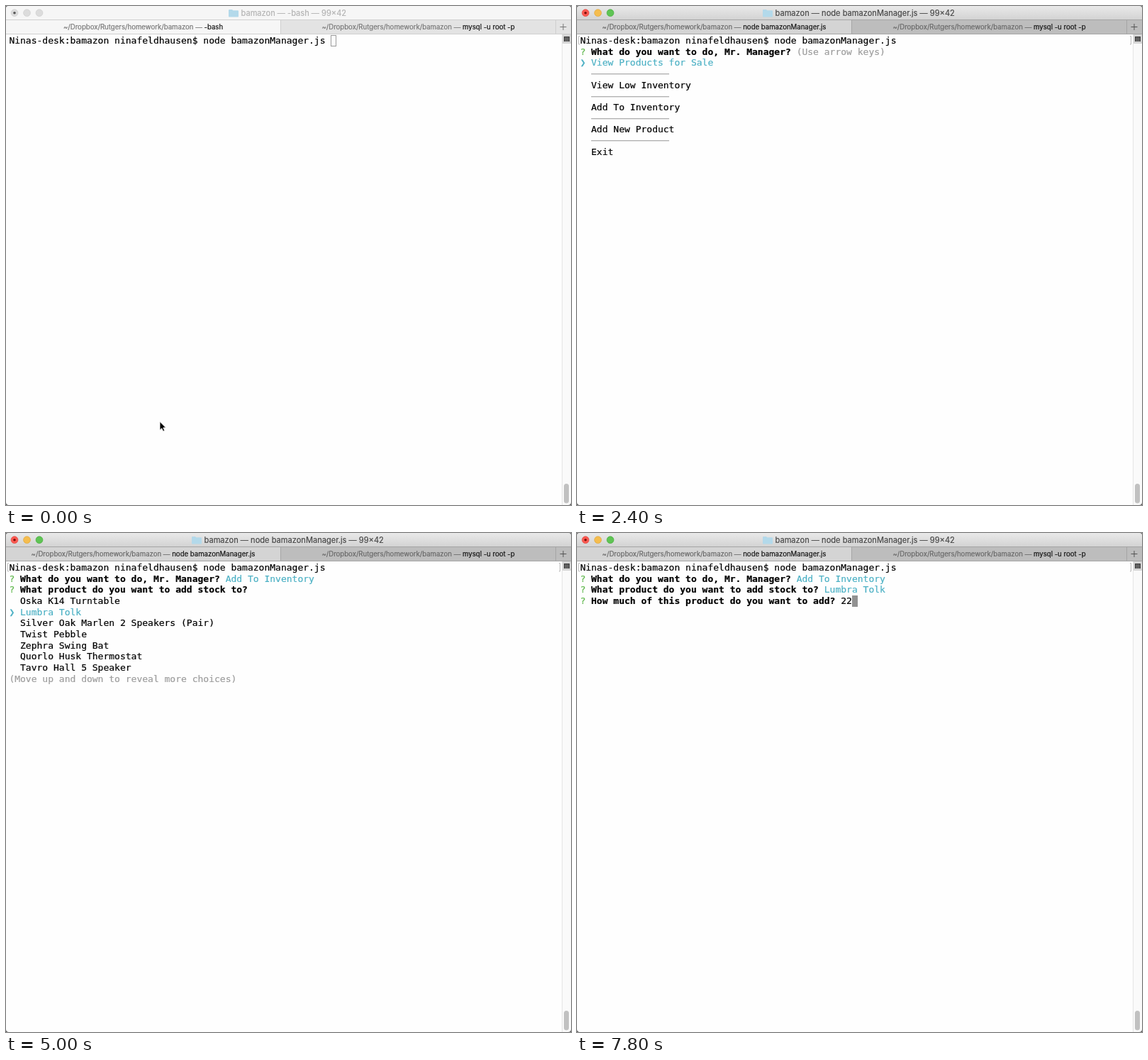
An HTML page for the animation above (8000 ms loop, 797 by 703 pixels).

```html
<!DOCTYPE html>
<html lang="en">
<head>
<meta charset="utf-8">
<title>Terminal</title>
<style>
html, body { margin: 0; width: 100%; height: 100%; overflow: hidden; background: #fefefe; }
svg { display: block; width: 797px; height: 703px; }
text { white-space: pre; stroke-width: .2px; }
.mono { font: 13px "DejaVu Sans Mono", monospace; }
.bold { font-weight: 700; }
.title { font: 11.1px Inter, sans-serif; }
.tab { font: 9.62px Inter, sans-serif; }
</style>
</head>
<body>
<svg id="stage" viewBox="0 0 797 703"></svg>
<script>
const stage = document.getElementById("stage");
const LOOP = 8000, COL = 7.827, ROW = 15.67, LEFT = 4.4;
const BLACK = "#000", GREEN = "#64b951", CYAN = "#4bb0c4", DIM = "#9d9d9d";
const PROMPT = "Ninas-desk:bamazon ninafeldhausen$ node bamazonManager.js ";
const ASK = "What do you want to do, Mr. Manager?";
const PICK = "What product do you want to add stock to?";
const COUNT = "How much of this product do you want to add?";
const HINT = "(Use arrow keys)";
const MENU = ["View Products for Sale", "View Low Inventory", "Add To Inventory", "Add New Product", "Exit"];
const GOODS = ["Oska K14 Turntable", "Lumbra Tolk", "Silver Oak Marlen 2 Speakers (Pair)",
  "Twist Pebble", "Zephra Swing Bat", "Quorlo Husk Thermostat", "Tavro Hall 5 Speaker"];

const rect = (x, y, w, h, fill, more = "") =>
  `<rect x="${x}" y="${y}" width="${w}" height="${h}" fill="${fill}" ${more}/>`;
const path = (d, fill, more = "") => `<path d="${d}" fill="${fill}" ${more}/>`;
const label = (cls, x, y, s, fill, more = "") =>
  `<text class="${cls}" x="${x}" y="${y}" fill="${fill}" stroke="${fill}" ${more}>${s}</text>`;

const put = (row, col, s, fill = BLACK, bold = false) =>
  label(bold ? "mono bold" : "mono", LEFT + col * COL, 53 + row * ROW, s, fill);

function caret(row, col, active) {
  const x = Math.round(LEFT + col * COL), y = Math.round(41 + row * ROW);
  return active ? rect(x, y, 8, 16, "#929292")
    : rect(x + .5, y + .5, 7, 15, "none", 'stroke="#9a9a9a"');
}

function question(row, s, answer = "", fill = CYAN) {
  return put(row, 0, "?", GREEN) + put(row, 2, s, BLACK, true) + put(row, s.length + 3, answer, fill);
}

function choice(row, s, on) {
  return (on ? put(row, 0, "❯", CYAN) : "") + put(row, 2, s, on ? CYAN : BLACK);
}

function menu(pick, hint) {
  return question(1, ASK, hint, DIM) + MENU.map((s, i) =>
    choice(2 + 2 * i, s, i === pick) +
    (i < 4 ? rect(20, Math.round(95.4 + 2 * i * ROW), 110, 1.4, "#b2b2b2") : "")).join("");
}

function goods(pick) {
  return question(1, ASK, MENU[2]) + question(2, PICK, pick ? "" : HINT, DIM) +
    GOODS.map((s, i) => choice(3 + i, s, i === pick)).join("") +
    put(10, 0, "(Move up and down to reveal more choices)", DIM);
}

function amount(typed) {
  return question(1, ASK, MENU[2]) + question(2, PICK, GOODS[1]) +
    question(3, COUNT, typed, BLACK) + caret(3, 47 + typed.length, true);
}

function lights(active) {
  const fills = active ? ["#fb5a52", "#f5bd4f", "#5fc454"] : Array(3).fill("#dcdcdc");
  const rims = active ? ["#e2463f", "#dfa53a", "#47ad3c"] : Array(3).fill("#cfcfcf");
  return fills.map((f, i) =>
    `<circle cx="${12 + 17.5 * i}" cy="9.7" r="4.9" fill="${f}" stroke="${rims[i]}" stroke-width=".7"/>`).join("") +
    `<circle cx="12" cy="9.7" r="1.8" fill="${active ? "#7a0f0b" : "#555"}"/>`;
}

function frame(active, running) {
  const ink = active ? "#484848" : "#b3b3b3";
  const soft = active ? "#686868" : "#777";
  const line = active ? "#a5a5a5" : "#cfcfcf";
  const x = running ? 262 : 314;
  const job = running ? "node bamazonManager.js" : "-bash";
  const dir = "~/Dropbox/Rutgers/homework/bamazon — ";
  const tab = (cx, name) => label("tab", cx, 33,
    `${dir}<tspan fill="#111" stroke="#111">${name}</tspan>`, soft, 'text-anchor="middle"');
  return rect(0, 0, 797, 20, active ? "url(#bar)" : "#f6f6f6") +
    rect(0, 20, 388, 20, active ? "#d4d4d4" : "#f6f6f6") +
    rect(388, 20, 409, 20, active ? "#bdbdbd" : "#e3e3e3") +
    rect(0, 19, 797, 1, line) + rect(0, 39, 797, 1, line) +
    rect(387, 20, 1, 20, line) + rect(775, 20, 1, 20, line) +
    lights(active) +
    path(`M${x} 6q0-1 1-1h4l1.3 1.2h6.7q1 0 1 1v7.3q0 1-1 1h-12q-1 0-1-1z`, "#b3d9ea") +
    label("title", x + 17.5, 14, `bamazon — ${job} — 99×42`, ink) +
    tab(193.5, job) + tab(581.5, "mysql -u root -p") +
    path("M781.5 29.5h9M786 25v9", "none", `stroke="${active ? "#555" : "#777"}"`);
}

function gutter() {
  return rect(784, 40, 13, 663, "#fafafa") + rect(784, 40, 1, 663, "#e4e4e4") +
    rect(785, 40, 12, 13, "#d6d6d6") + rect(787, 43, 8, 7, "#3c3c3c") +
    path("M788 45h6M788 47h6M788 49h6", "none", 'stroke="#aaa" stroke-width=".7"') +
    rect(787, 673, 7, 27.5, "#c1c1c1", 'rx="3.5"');
}

const arrow = path("M217 585.5v12l2.7-2.6 2 4.3 2-.9-1.9-4.2h3.7z", "#000", 'stroke="#fff" stroke-width=".8"');
const beam = path("M213.5 579.5q3 0 3.5 1.5q.5-1.5 3.5-1.5M217 581v10M213.5 592.5q3 0 3.5-1.5q.5 1.5 3.5 1.5M215 587.5h4",
  "none", 'stroke="#222" stroke-width="1.2"');
const corners = path("M0 703v-4q0 4 4 4zM797 703v-4q0 4-4 4zM0 0h3q-3 0-3 3zM797 0h-3q3 0 3 3z", "#555");
const defs = `<defs><linearGradient id="bar" x2="0" y2="1"><stop stop-color="#e9e9e9"/>
<stop offset="1" stop-color="#d2d2d2"/></linearGradient></defs>`;

function shell(active, pointer) {
  return frame(active, false) + put(0, 0, PROMPT) + caret(0, 58, active) + pointer;
}

function program(body) {
  return frame(true, true) + put(0, 0, PROMPT) +
    path("M4 42.5h-1.5v11.5h1.5M780 42.5h1.5v11.5h-1.5", "none", 'stroke="#b9b9b9"') + body;
}

const scenes = [
  [0, () => shell(false, arrow)],
  [200, () => shell(true, arrow)],
  [400, () => shell(true, beam)],
  [1800, () => shell(true, "")],
  [2000, () => program(caret(1, 0, true))],
  [2200, () => program(menu(0, HINT))],
  [2600, () => program(menu(1, ""))],
  [2800, () => program(menu(2, ""))],
  [3600, () => program(goods(0))],
  [4800, () => program(goods(1))],
  [5400, () => program(amount(""))],
  [7600, () => program(amount("2"))],
  [7800, () => program(amount("22"))]
];

let shown = null;
function draw(ms) {
  const scene = scenes.findLast(s => s[0] <= ms);
  if (scene === shown) return;
  shown = scene;
  stage.innerHTML = defs + rect(0, 0, 797, 703, "#fefefe") + gutter() + scene[1]() + corners;
}

const start = performance.now();
function tick() {
  draw((performance.now() - start) % LOOP);
  requestAnimationFrame(tick);
}
tick();
</script>
</body>
</html>
```
